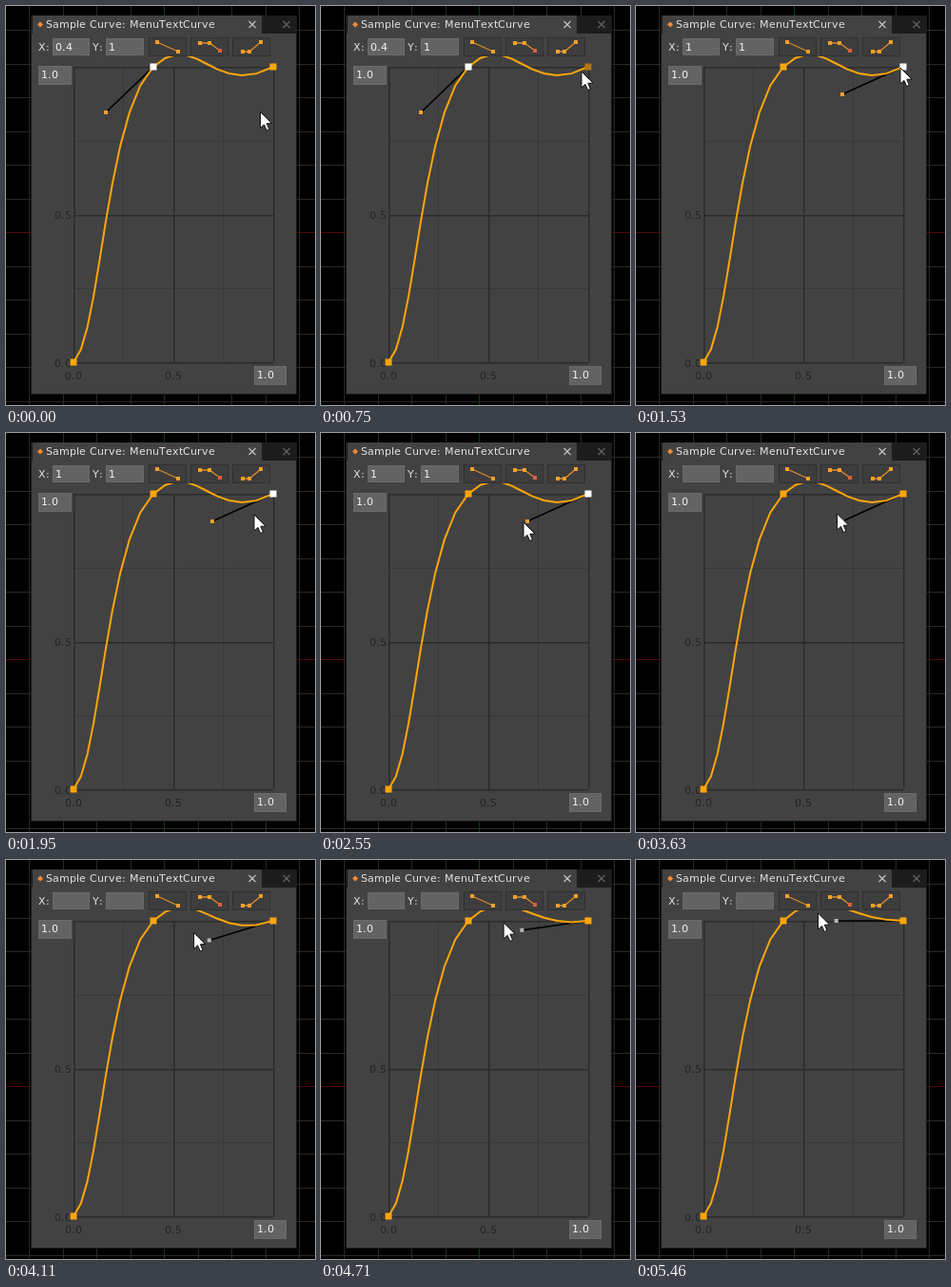
Animation of 325 by 420 pixels, one loop 5640 ms. Source, as an HTML page with a canvas:

```html
<!DOCTYPE html>
<html lang="en">
<head>
<meta charset="utf-8">
<title>Curve editor</title>
<style>
  html, body { margin: 0; width: 100%; height: 100%; overflow: hidden; background: #000; }
  canvas { display: block; }
</style>
</head>
<body>
<canvas id="stage" width="325" height="420"></canvas>
<script>
const ctx = document.getElementById('stage').getContext('2d');
const LOOP = 5640, STEP = 30;
const ORANGE = '#ffa50a', KNOB = '#f5a02a', PANEL = '#424242', TEXT = '#e2e2e2', INK = '#242424';

const PLOT = { x: 71, y: 64, w: 210, h: 311 };
const START = [71, 375], MID = [155, 64], END = [281, 64];
const MID_HANDLE = [105, 112];
const HANDLE_LENGTH = 70.3, FULL_SLOPE = 0.453;

const SELECT = 1530, GRAB = 3270, DRAG = 3630, DROP = 5460;

// Pointer legs before the drag: each ends at a place and a time
const LEGS = [
  { at: 300, to: [267.5, 111.5] },
  { at: 750, to: [274, 69] },
  { at: 900, to: [278, 65] },
  { at: 1770, to: [278, 65] },
  { at: 1950, to: [261, 86] },
  { at: 2310, to: [213, 94] },
  { at: 3240, to: [213, 94] },
  { at: DRAG, to: [211.5, 85] }
];

const mix = (a, b, k) => a + (b - a) * k;
const progress = (time, from, to) => Math.min(1, Math.max(0, (time - from) / (to - from)));

// Part of the tangent's slope that is left while it is dragged flat
const slopeLeft = time => (1 - progress(time, DRAG, DROP)) ** 1.3;

function handleAt(left) {
  const angle = Math.atan(FULL_SLOPE * left);
  return [END[0] - HANDLE_LENGTH * Math.cos(angle), END[1] + HANDLE_LENGTH * Math.sin(angle)];
}

function pointerAt(time, left, handle) {
  if (time >= DRAG) return [191.5 + 20 * left ** 3, handle[1] - 8];
  const next = LEGS.findIndex(leg => leg.at > time);
  if (next === 0) return LEGS[0].to;
  const a = LEGS[next - 1], b = LEGS[next];
  return a.to.map((v, i) => mix(v, b.to[i], progress(time, a.at, b.at)));
}

function rect(x, y, w, h, fill) {
  ctx.fillStyle = fill;
  ctx.fillRect(x, y, w, h);
}

function box(x, y, w, h, fill, border) {
  rect(x, y, w, h, border);
  rect(x + 1, y + 1, w - 2, h - 2, fill);
}

function square([x, y], size, fill) {
  rect(x - size / 2, y - size / 2, size, size, fill);
}

function path(points, color, width) {
  ctx.beginPath();
  points.forEach(p => ctx.lineTo(...p));
  ctx.strokeStyle = color;
  ctx.lineWidth = width;
  ctx.stroke();
}

// Letters advance by whole pixels
function label(text, x, y, color) {
  ctx.font = '11px "DejaVu Sans", sans-serif';
  ctx.fillStyle = color;
  for (const ch of text) {
    ctx.fillText(ch, x, y);
    x += Math.round(ctx.measureText(ch).width + 0.05);
  }
}

function field(x, y, w, h, text) {
  box(x, y, w, h, '#636363', '#6a6a6a');
  label(text, x + 3, y + 13, '#f2f2f2');
}

function cross(x, y, color) {
  for (const side of [-1, 1]) path([[x - 3.5, y - 3.5 * side], [x + 3.5, y + 3.5 * side]], color, 1.1);
}

function drawBackdrop() {
  rect(0, 0, 325, 420, '#000');
  for (let i = -6; i <= 5; i++) {
    rect(Math.round(166 + i * 35.5), 0, 1, 420, i ? '#292929' : '#0b3d14');
    rect(0, Math.round(238 + i * 35.5), 325, 1, i ? '#292929' : '#520808');
  }
}

function drawPanel() {
  rect(26, 10, 280, 399, '#1d1d1d');
  rect(27, 29, 278, 379, PANEL);
  rect(28, 10, 241, 19, PANEL);
  ctx.beginPath();
  [[36, 16.5], [39, 19.5], [36, 22.5], [33, 19.5]].forEach(p => ctx.lineTo(...p));
  ctx.fillStyle = '#f58a35';
  ctx.fill();
  label('Sample Curve: MenuTextCurve', 42, 23, TEXT);
  cross(259, 19.5, '#c8c8c8');
  cross(295, 19.5, '#666');
}

function drawAxes() {
  const { x, y, w, h } = PLOT;
  for (const i of [1, 3, 0, 2, 4]) {
    const [color, width] = i % 2 ? ['#383838', 1] : ['#2b2b2b', 1.5];
    rect(Math.floor(x + w * i / 4), y, width, h, color);
    rect(x, Math.round(y + h * i / 4), w, width, color);
  }
  label('0.5', 51, 224, INK);
  label('0.0', 51, 380, INK);
  label('0.0', 62, 393, INK);
  label('0.5', 167, 393, INK);
}

function drawToolbar(xValue, yValue) {
  label('X:', 34, 47, TEXT);
  field(49, 34, 39, 18, xValue);
  label('Y:', 91, 47, TEXT);
  field(105, 34, 40, 18, yValue);
  const icons = [
    [[159, 38], [181, 48]],
    [[204, 39], [214, 39], [225, 47]],
    [[249, 48], [256, 48], [268, 38]]
  ];
  icons.forEach((points, i) => {
    box(150 + i * 44, 33, 40, 20, '#3d3d3d', '#303030');
    path(points, '#dc8c2a', 1.3);
    points.forEach((p, j) => square(p, 4, j === 2 && i === 1 ? '#e0603c' : KNOB));
  });
}

// Segments are drawn with ten chords each
function bezier(...controls) {
  const at = (t, axis) => {
    let values = controls.map(p => p[axis]);
    while (values.length > 1) values = values.slice(1).map((v, i) => mix(values[i], v, t));
    return values[0];
  };
  return Array.from({ length: 11 }, (_, i) => [at(i / 10, 0), at(i / 10, 1)]);
}

function drawCurve(left) {
  const endControl = [END[0] - 63, END[1] + 34 * left];
  path([
    ...bezier(START, [99, 350], MID_HANDLE, MID),
    ...bezier(MID, [200, 22], endControl, END)
  ], ORANGE, 2);
}

function drawTangent(point, handle, color) {
  path([point, handle], '#000', 1.7);
  square(handle, 4, color);
}

function drawPointer([x, y]) {
  ctx.beginPath();
  [[0, 0], [0, 17], [4, 13.4], [6.7, 19.5], [9.4, 18.3], [6.8, 12.3], [12, 12]]
    .forEach(([dx, dy]) => ctx.lineTo(x + dx, y + dy));
  ctx.closePath();
  ctx.fillStyle = '#fff';
  ctx.fill();
  ctx.strokeStyle = '#111';
  ctx.lineWidth = 1;
  ctx.stroke();
}

function draw(time) {
  const left = slopeLeft(time);
  const handle = handleAt(left);
  const pointer = pointerAt(time, left, handle);
  const selected = time >= SELECT, grabbed = time >= GRAB;
  const hovered = Math.hypot(pointer[0] - END[0], pointer[1] - END[1]) < 11;

  drawBackdrop();
  drawPanel();
  drawAxes();

  ctx.save();
  ctx.beginPath();
  ctx.rect(27, 53, 278, 355);
  ctx.clip();
  if (selected) drawTangent(END, handle, grabbed ? '#b9b9b9' : KNOB);
  else drawTangent(MID, MID_HANDLE, KNOB);
  drawCurve(left);
  ctx.restore();

  square(START, 7, ORANGE);
  square(MID, 7, selected ? ORANGE : '#fff');
  square(END, 7, grabbed ? ORANGE : selected ? '#fff' : hovered ? '#b27714' : ORANGE);

  if (grabbed) drawToolbar('', '');
  else drawToolbar(selected ? '1' : '0.4', '1');
  field(34, 63, 35, 20, '1.0');
  field(261, 379, 34, 20, '1.0');
  drawPointer(pointer);
}

const begin = performance.now();
function tick() {
  const time = (performance.now() - begin) % LOOP;
  draw(Math.floor(time / STEP) * STEP);
  requestAnimationFrame(tick);
}
tick();
</script>
</body>
</html>
```
